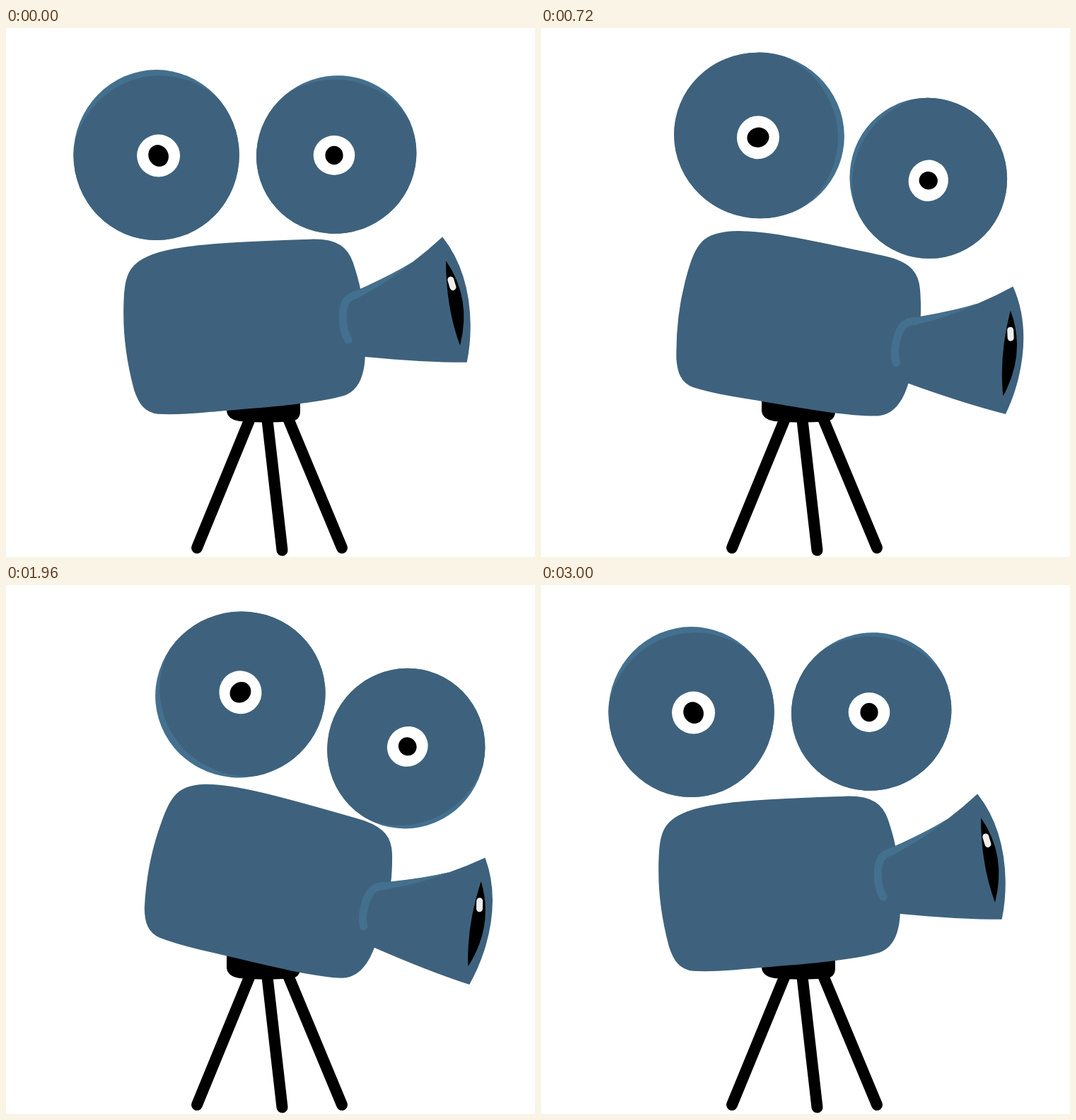
Write an HTML page that moves like this. It is 748 px wide and 748 px high and loops after 3.04 s.

```html
<!DOCTYPE html>
<html lang="en">
<head>
<meta charset="utf-8">
<title>Film camera</title>
<style>
  html, body { margin: 0; width: 100%; height: 100%; overflow: hidden; background: #fff; }
  svg { display: block; width: 100%; height: 100%; }
  .main { fill: #3e627d; }
  .body { stroke: #3e627d; stroke-width: 1.6; }
  .light { fill: #44708f; }
  .line { fill: none; stroke-linecap: round; stroke-linejoin: round; }
</style>
</head>
<body>
<svg viewBox="0 0 748 748">
  <defs>
    <clipPath id="rimA"><ellipse cx="-3" cy="-1" rx="117.2" ry="120.5"/></clipPath>
    <clipPath id="rimB"><ellipse cx="3.2" cy="-1" rx="113.8" ry="111.2" transform="rotate(150 3.2 -1)"/></clipPath>
  </defs>

  <!-- tripod -->
  <path d="M312 515H416V542Q416 555 402 556.5Q365 559 330 556Q312 553 312 540Z"/>
  <path class="line" stroke="#000" stroke-width="16" d="M346 550L270 735M369 550L390.500 738.500M398 550L475 735"/>

  <g id="head">
    <path class="main body" d="M167 405C167 350 172 335 207 321C250 305 340 303 430 299.500
      C470 298 483 312 490 332C496 350 499 362 500.500 370Q545 350 575 332Q597 315 617 296.500
      Q655 345 656 420Q656 448 651 472Q590 472 507 464C506 490 498 512 478 519
      C430 533 330 538 290 542C260 545 235 546 215 545C196 543 188 530 182 512
      C172 475 167 440 167 405Z"/>
    <path class="light" d="M488 374L500 370Q545 350 577 329.500Q540 360 495 383Z"/>
    <path class="line" stroke="#44708f" stroke-width="11" d="M484 441C474 425 474 395 482 385Q487 379 496 377"/>
    <path d="M622 329Q659 382 642 449Q622 395 622 329Z"/>
    <path class="line" stroke="#eee" stroke-width="9" d="M628.800 356L632 366.500"/>

    <g id="reelA">
      <g clip-path="url(#rimA)">
        <rect class="light" x="-130" y="-130" width="260" height="260"/>
        <ellipse class="main" cx="2" cy="14.700" rx="124.700" ry="128"/>
      </g>
      <ellipse fill="#fff" rx="30.500" ry="30"/>
      <ellipse rx="15.600" ry="14" transform="rotate(65)"/>
    </g>
    <g id="reelB">
      <g clip-path="url(#rimB)">
        <rect class="light" x="-130" y="-130" width="260" height="260"/>
        <circle class="main" cx="1" cy="18.800" r="126"/>
      </g>
      <ellipse fill="#fff" rx="29.300" ry="28"/>
      <ellipse rx="12.600" ry="13.200"/>
    </g>
  </g>
</svg>
<script>
  const LOOP = 3040, STEP = 40, TURN = 3000, TILT = 18.1;
  const [head, reelA, reelB] = ["head", "reelA", "reelB"].map(id => document.getElementById(id));

  const ease = (t, start, length) => {
    const x = Math.min(1, Math.max(0, (t - start) / length));
    return (1 - Math.cos(Math.PI * x)) / 2;
  };

  function draw(now) {
    const t = Math.floor(now % LOOP / STEP) * STEP;
    const tilt = TILT * (ease(t, 286, 620) - ease(t, 1952, 700));
    const spin = t / TURN * 360;
    head.setAttribute("transform", `rotate(${tilt} 364 530)`);
    reelA.setAttribute("transform", `translate(215.600 180.600) rotate(${spin})`);
    reelB.setAttribute("transform", `translate(464 180) rotate(${-spin})`);
  }

  const begin = performance.now();
  (function loop() {
    draw(performance.now() - begin);
    requestAnimationFrame(loop);
  })();
</script>
</body>
</html>
```
